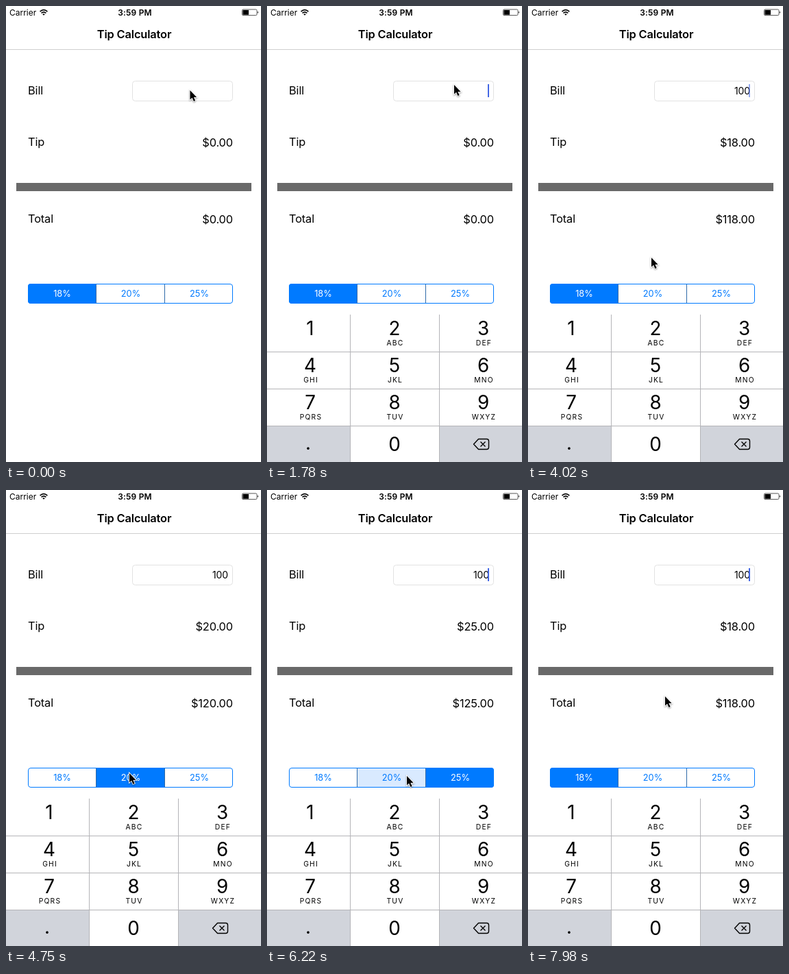
An HTML page for the animation above (8000 ms loop, 372 by 665 pixels).

```html
<!DOCTYPE html>
<html lang="en">
<head>
<meta charset="utf-8">
<title>Tip Calculator</title>
<style>
  html, body { margin: 0; width: 100%; height: 100%; overflow: hidden; background: #fff; }
  svg { display: block; width: 372px; height: 665px; }
  text { font: 16.4px Inter, sans-serif; letter-spacing: -.15px; white-space: pre; }
  .end { text-anchor: end; }
  .mid { text-anchor: middle; }
  .status { font-size: 12px; letter-spacing: 0; }
  .bold { font-weight: 600; }
  .seg { font-size: 12.8px; letter-spacing: 0; }
  .digit { font-size: 27.8px; letter-spacing: 0; }
  .letters { font-size: 10.3px; letter-spacing: 1.2px; }
  #pointer { filter: drop-shadow(0 1px 1px #0006); }
</style>
</head>
<body>
<svg viewBox="0 0 372 665">
  <text class="status" x="5" y="14">Carrier</text>
  <g fill="none" stroke="#000" stroke-width="1.7">
    <path d="M49.6 8.2q5.4-5 10.8 0M51.6 10.4q3.4-3.1 6.8 0"/>
    <path d="M53.2 11.9q1.8-1.5 3.6 0L55 13.8z" fill="#000" stroke="none"/>
  </g>
  <text class="status bold mid" x="188" y="14" style="letter-spacing:.2px">3:59 PM</text>
  <rect x="344.5" y="5" width="21.5" height="8.6" rx="1.5" fill="none" stroke="#555"/>
  <path d="M345.5 6h8.5v6.7h-8.5zM367 7.8q2 1.5 0 3z"/>
  <text class="bold mid" x="187" y="47">Tip Calculator</text>
  <path d="M0 63h372v1H0z" fill="#cfcfcf"/>

  <text x="32" y="129">Bill</text>
  <rect x="184.5" y="109.5" width="146" height="29" rx="4" fill="#fff" stroke="#e2e2e2"/>
  <text id="bill" class="end" x="324" y="129" style="font-size:14px"></text>
  <rect id="caret" x="322" y="114" width="2" height="19" fill="#4468e4"/>
  <text x="32" y="203.500">Tip</text>
  <text id="tip" class="end" x="331" y="205"></text>
  <path d="M15 258h343v12H15z" fill="#696969"/>
  <text x="32" y="315.500">Total</text>
  <text id="total" class="end" x="331" y="317"></text>

  <clipPath id="round"><rect x="32" y="405" width="299" height="29" rx="4"/></clipPath>
  <g id="segments" clip-path="url(#round)"></g>
  <path d="M131.500 406v27M231.500 406v27" stroke="#2f6aa8"/>
  <rect x="32.500" y="405.500" width="298" height="28" rx="3.500" fill="none" stroke="#007aff"/>

  <g id="keyboard"></g>
  <path id="pointer" d="M0 0v13.500l3.100-2.800 2.300 5.200 2.300-1-2.300-5h4.200z"
        stroke="#fff" stroke-width="1.800" paint-order="stroke"/>
</svg>
<script>
const $ = id => document.getElementById(id);
const LOOP = 8000, TICK = 147.7;
const RATES = [18, 20, 25];

// [tick, x, y] of the pointer's tip
const PATH = [
  [0, 268.5, 123], [1, 273, 115], [14, 273, 115], [16, 79, 405], [23, 79, 405],
  [27, 180, 367], [30, 180, 413], [33, 180, 413], [37, 278, 415], [39, 278, 415],
  [42, 204, 417], [43, 204, 417], [47, 95, 426], [49, 87, 421], [50, 87, 421], [54, 200, 301]
];
// [tick, value] steps
const BILL = [[0, 0], [16, 1], [19, 10], [20, 100]];
const SELECTED = [[0, 0], [31, 1], [39, 2], [43, 1], [50, 0]];
const PRESSED = [[0, -1], [30, 1], [31, -1], [38, 2], [39, -1], [42, 1], [43, -1], [49, 0], [50, -1]];

const clamp = v => Math.max(0, Math.min(1, v));
const stepAt = (steps, n) => steps.filter(s => s[0] <= n).pop()[1];
const money = v => '$' + v.toFixed(2);

$('segments').innerHTML = RATES.map((rate, i) =>
  `<rect x="${i ? 31 + 100 * i : 32}" y="405" width="101" height="29"/>
   <text class="seg mid" x="${82 + 100 * i}" y="424.3">${rate}%</text>`).join('');
const segments = RATES.map((_, i) => [...$('segments').children].slice(2 * i, 2 * i + 2));

function buildKeyboard() {
  const columns = [63, 186, 315.5];
  const letters = ['', 'ABC', 'DEF', 'GHI', 'JKL', 'MNO', 'PQRS', 'TUV', 'WXYZ'];
  const keys = letters.map((label, i) => {
    const x = columns[i % 3], y = 480 + 54 * Math.floor(i / 3);
    return `<text class="digit mid" x="${x}" y="${y}">${i + 1}</text>
      <text class="letters mid" x="${x + 1}" y="${y + 15}">${label}</text>`;
  }).join('');
  $('keyboard').innerHTML = `
    <path d="M0 450h372v215H0z" fill="#fff"/>
    <path d="M0 613h121v52H0zM252 613h120v52H252z" fill="#d1d4db"/>
    <path d="M121.5 450v215M251.5 450v215M0 504.5h372M0 558.5h372M0 612.5h372" stroke="#b4b4b8"/>
    ${keys}
    <text class="digit mid" x="60" y="647">.</text>
    <text class="digit mid" x="186" y="649">0</text>
    <path d="M308.5 631.5h12q3 0 3 3v9q0 3-3 3h-12l-7-7.500zM311.500 635.500l7 7m0-7l-7 7"
      fill="none" stroke="#000" stroke-width="1.4" stroke-linejoin="round"/>`;
}

function pointerAt(n) {
  const i = Math.max(1, PATH.findIndex(p => p[0] >= n));
  const [n0, x0, y0] = PATH[i - 1], [n1, x1, y1] = PATH[i];
  const u = clamp((n - n0) / (n1 - n0)), e = u * u * (3 - 2 * u);
  return [x0 + (x1 - x0) * e, y0 + (y1 - y0) * e];
}

function caretAlpha(n) {
  if (n < 5) return 0;
  if (n >= 12 && n < 24) return 1; // steady while typing
  const phase = (n - (n < 12 ? 11 : 27)) / 6.55 - 0.3;
  return clamp((0.37 - Math.abs(phase - Math.round(phase))) * 8);
}

function draw(now) {
  const n = Math.floor(now % LOOP / TICK);
  const bill = stepAt(BILL, n), selected = stepAt(SELECTED, n), pressed = stepAt(PRESSED, n);
  const tip = bill * RATES[selected] / 100;
  $('bill').textContent = bill || '';
  $('tip').textContent = money(tip);
  $('total').textContent = money(bill + tip);
  $('caret').setAttribute('opacity', caretAlpha(n));
  segments.forEach(([box, label], i) => {
    box.setAttribute('fill', i === selected ? '#007aff' : i === pressed ? '#d9eaff' : '#fff');
    label.setAttribute('fill', i === selected ? '#fff' : '#007aff');
  });
  const hidden = (1 - clamp((n - 4.6) / 3)) ** 3;
  $('keyboard').setAttribute('transform', `translate(0 ${215 * hidden})`);
  $('pointer').setAttribute('transform', `translate(${pointerAt(n)})`);
  requestAnimationFrame(draw);
}

buildKeyboard();
draw(0);
</script>
</body>
</html>
```
